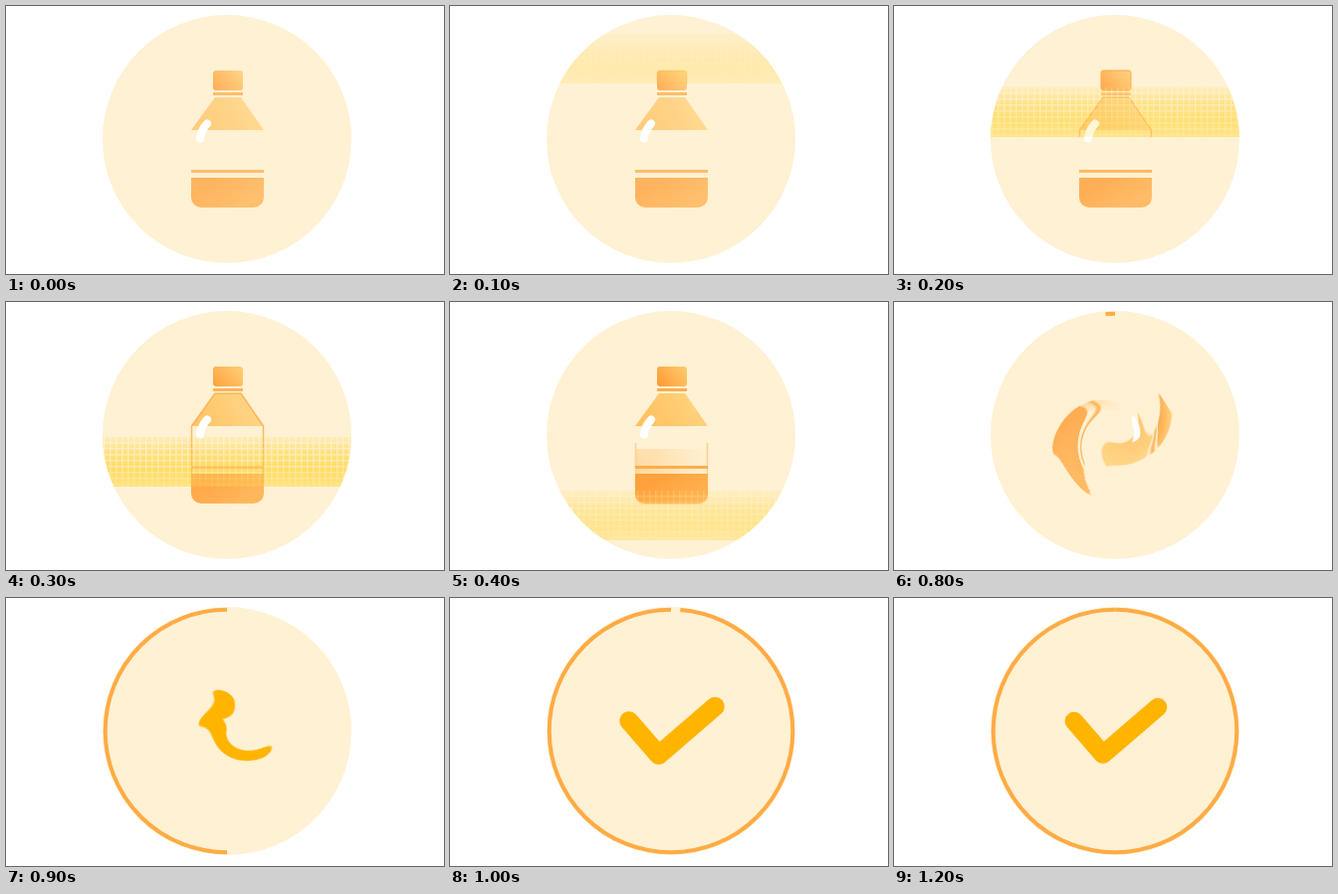
Write an HTML page with a canvas that moves like this. It is 440 by 270 pixels and loops after 1.25 s.

```html
<!DOCTYPE html>
<html lang="en">
<head>
<meta charset="utf-8">
<title>Bottle scan</title>
<style>
  html, body { margin: 0; width: 100%; height: 100%; overflow: hidden; background: #fff; }
  canvas { display: block; }
</style>
</head>
<body>
<canvas id="stage" width="440" height="270"></canvas>
<script>
const LOOP = 1250, STEP = 50, W = 440, H = 270, CX = 222, CY = 134, R = 125;
const CREAM = '#fff1d3', ORANGE = '#ffab45', AMBER = '#ffb400';

const stage = document.getElementById('stage').getContext('2d');
const layer = document.createElement('canvas');
layer.width = W;
layer.height = H;
const art = layer.getContext('2d');

const clamp = x => Math.min(1, Math.max(0, x));
const progress = (t, from, to) => clamp((t - from) / (to - from));
const smooth = x => x * x * (3 - 2 * x);
const mix = (a, b, x) => a + (b - a) * x;

function gradient(x0, y0, x1, y1, ...colors) {
  const g = art.createLinearGradient(x0, y0, x1, y1);
  colors.forEach((c, i) => g.addColorStop(i / (colors.length - 1), c));
  return g;
}

function roundedBox(...args) {
  const p = new Path2D();
  p.roundRect(...args);
  return p;
}

const disc = new Path2D();
disc.arc(CX, CY, R, 0, Math.PI * 2);

const cap = roundedBox(208, 65, 30, 20, 3);
const shoulder = new Path2D('M210 92H236L259 125H186Z');
const base = roundedBox(186, 173, 73, 30, [0, 0, 10, 10]);
const body = new Path2D('M210 92H236L258.5 125V193Q258.5 203 249 203H196Q186.5 203 186.5 193V125Z');
const shine = new Path2D('M202 118.5Q196 125 195 133.5');
const tick = new Path2D('M181 124L210 157.5L265 110');

const paints = {
  cap: gradient(236, 65, 212, 85, '#ffc868', '#ff982b'),
  shoulder: gradient(250, 92, 195, 125, '#ffd27c', '#ffbd57'),
  base: gradient(235, 203, 215, 173, '#ffad48', '#ff9c32')
};

function drawBeam(top, alpha) {
  art.save();
  art.clip(disc);
  art.globalAlpha = alpha;
  art.fillStyle = gradient(0, top, 0, top + 50,
    'rgba(255,221,100,.2)', 'rgba(255,221,100,.75)', '#ffdd64', 'rgba(255,221,100,.7)');
  art.fillRect(96, top, 252, 50);
  art.fillStyle = gradient(0, top, 0, top + 50, CREAM, 'rgba(255,241,211,.2)');
  for (let x = 98; x < 348; x += 6) art.fillRect(x, top, 1.5, 50);
  for (let y = 5; y < 50; y += 6) art.fillRect(96, top + y, 252, 1.5);
  art.restore();
}

function drawOutline(top, alpha) {
  art.save();
  art.beginPath();
  art.rect(180, top - 48, 86, 98);
  art.clip();
  art.globalAlpha = alpha;
  art.strokeStyle = ORANGE;
  art.lineWidth = 1.5;
  art.stroke(body);
  art.stroke(cap);
  art.restore();
}

// Soft tint left in the lower corner of the label
function drawResidue(t) {
  const grow = progress(t, 250, 400), fade = progress(t, 400, 600);
  if (!grow) return;
  const g = art.createRadialGradient(187, 172, 0, 187, 172, mix(75, 24, fade));
  g.addColorStop(0, 'rgba(255,180,80,.4)');
  g.addColorStop(1, 'rgba(255,180,80,0)');
  art.globalAlpha = grow;
  art.fillStyle = g;
  art.fillRect(187, 148, 71, 25);
  art.globalAlpha = 1;
}

function drawBottle(t) {
  const top = 82 + (t - 200) * 0.54;
  const glow = t < 550 ? Math.sin(Math.PI * t / 550) ** 2 : 0;
  if (glow) drawBeam(top, glow);
  drawResidue(t);

  art.globalAlpha = mix(0.72, 1, smooth(progress(t, 50, 550))) - 0.2 * progress(t, 700, 800);
  art.fillStyle = paints.cap;
  art.fill(cap);
  art.fillStyle = paints.shoulder;
  art.fill(shoulder);
  art.fillStyle = paints.base;
  art.fill(base);
  art.fillStyle = ORANGE;
  art.fillRect(208, 87, 30, 3);
  art.fillRect(186, 165, 73, 3);
  art.globalAlpha = 1;

  if (glow) drawOutline(top, glow * 0.8);
  art.strokeStyle = '#fff';
  art.lineWidth = 8;
  art.stroke(shine);
  if (glow) drawBeam(top, glow * 0.35);
}

function drawTick() {
  art.strokeStyle = AMBER;
  art.lineWidth = 18.5;
  art.stroke(tick);
}

function drawArt(t) {
  const isTick = t > 825;
  const scale = !isTick ? mix(1, 0.87, smooth(progress(t, 650, 800)))
    : t < 1000 ? mix(0.7, 1.03, smooth(progress(t, 825, 1000)))
    : 1 + 0.03 * Math.exp((1000 - t) / 80);
  art.clearRect(0, 0, W, H);
  art.fillStyle = CREAM;
  art.fill(disc);
  art.save();
  art.lineCap = art.lineJoin = 'round';
  art.translate(CX, CY);
  art.scale(scale, scale);
  art.translate(-CX, -CY);
  isTick ? drawTick() : drawBottle(t);
  art.restore();
}

// Nested discs, each turned further than the one around it
function drawTwirl(strength) {
  for (let r = 100; r > 0; r--) {
    stage.save();
    stage.translate(CX, CY);
    stage.beginPath();
    stage.arc(0, 0, r, 0, Math.PI * 2);
    stage.clip();
    stage.rotate(strength * (1 - r / R) ** 2);
    stage.drawImage(layer, -CX, -CY);
    stage.restore();
  }
}

function drawRing(t) {
  const sweep = smooth(progress(t, 785, 1015)) * Math.PI * 2;
  if (!sweep) return;
  stage.strokeStyle = ORANGE;
  stage.lineWidth = 4;
  stage.beginPath();
  stage.arc(CX, CY, 122.3, -Math.PI / 2, -Math.PI / 2 - sweep, true);
  stage.stroke();
}

function render(t) {
  stage.fillStyle = '#fff';
  stage.fillRect(0, 0, W, H);
  drawArt(t);
  stage.drawImage(layer, 0, 0);
  const twist = Math.sin(Math.PI * progress(t, 650, 1000)) ** 2;
  if (twist > 0.001) drawTwirl(4.05 * twist);
  drawRing(t);
}

const start = performance.now();
function frame() {
  const t = (performance.now() - start) % LOOP;
  render(Math.floor(t / STEP) * STEP);
  requestAnimationFrame(frame);
}
frame();
</script>
</body>
</html>
```
